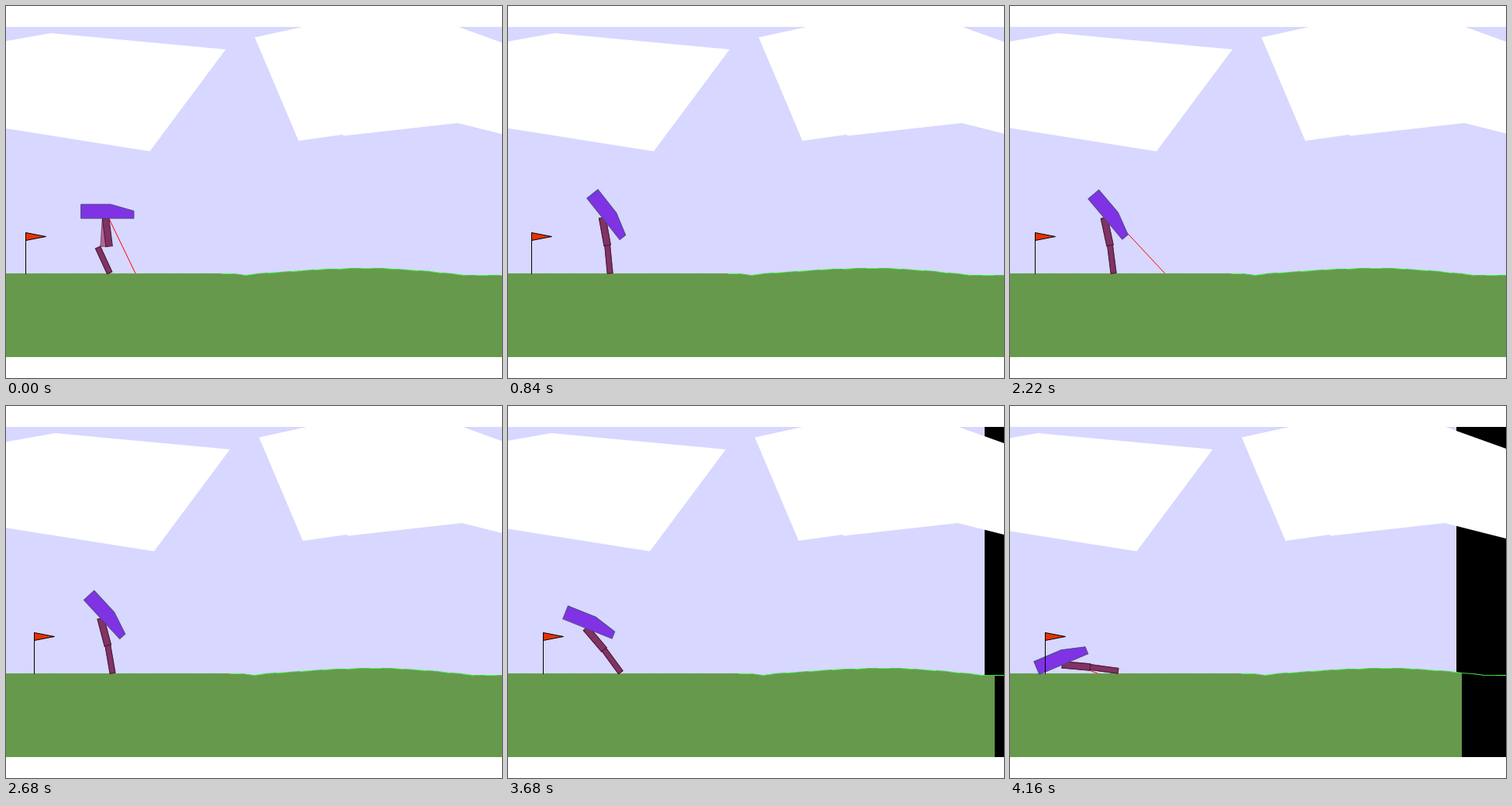
Recreate the animation shown at these times as an HTML page with a canvas. Size 640x480 px, loop 4180 ms.

```html
<!DOCTYPE html>
<html>
<head>
<meta charset="utf-8">
<title>Two-legged walker</title>
<style>
html, body { margin: 0; width: 100%; height: 100%; overflow: hidden; background: #fff; }
canvas { display: block; }
</style>
</head>
<body>
<canvas id="stage" width="640" height="480"></canvas>
<script>
const ctx = document.getElementById('stage').getContext('2d');
const { sin, cos, exp, min, max, floor, round, PI } = Math;
const LOOP = 4180, STEP = 20, HOME = 128.3;
const LEG = 36.3, HIP = 8.53, TILE = 14.933, RANGE = 170.7;
const RAD = PI / 180;

const CLOUDS = [
  [[-60, 57.5], [68, 35], [293.5, 56], [195.5, 187.5], [-60, 147]],
  [[331, 40.5], [420, 21], [580, 22], [740, 79.6], [740, 188], [593, 151],
   [446, 167.5], [444, 166], [387.5, 174]]
];
const HULL = [[-32, -9.6], [6.4, -9.6], [36.3, -1.07], [36.3, HIP], [-32, HIP]];
const BACK = ['#b26699', '#7f4c66'], FRONT = ['#7f3366', '#4c1933'];

// Flat start, then one low hill, steeper on its right side
function groundY(x) {
  if (x < 320) return 345.6;
  const d = x - 485;
  return 347.5 - 9 * cos(min(1, d < 0 ? -d / 160 : d / 130) * PI / 2);
}

function shape(points, fill, stroke) {
  ctx.beginPath();
  points.forEach(([x, y]) => ctx.lineTo(x, y));
  ctx.closePath();
  ctx.fillStyle = fill;
  ctx.fill();
  if (stroke) {
    ctx.strokeStyle = stroke;
    ctx.stroke();
  }
}

function line(x0, y0, x1, y1, color) {
  ctx.beginPath();
  ctx.moveTo(x0, y0);
  ctx.lineTo(x1, y1);
  ctx.strokeStyle = color;
  ctx.stroke();
}

function placed(x, y, angle, draw) {
  ctx.save();
  ctx.translate(x, y);
  ctx.rotate(angle * RAD);
  draw();
  ctx.restore();
}

function limb(x, y, angle, width, colors) {
  const w = width / 2;
  placed(x, y, -angle, () => shape([[-w, 0], [w, 0], [w, LEG], [-w, LEG]], ...colors));
}

// Hull pitches forward onto the hip stop, then everything topples back
// like an inverted pendulum. Joints are worked out from the foot upwards.
function pose(t) {
  const pitch = min(t / 470, 1), loose = max(0, 1 - t / 120);
  const fall = exp((t - 4160) * 0.0019);
  const thigh = 10.2 + 74.8 * fall - 3.2 * loose;
  const shin = thigh * 1.035 - 5.5 + 22.8 * loose;
  const tilt = (62 - thigh) * pitch * pitch * (3 - 2 * pitch);
  const footX = 146.5 - 7 * fall * fall + 7.2 * (1 - pitch) ** 2;
  const footY = 345 - 3.2 * fall - 0.5 * loose;
  const kneeX = footX - LEG * sin(shin * RAD);
  const kneeY = footY - LEG * cos(shin * RAD);
  const hipX = kneeX + 14.5 * loose - LEG * sin(thigh * RAD);
  const hipY = kneeY - 1.4 * loose - LEG * cos(thigh * RAD);
  return {
    thigh, shin, tilt, kneeX, kneeY, hipX, hipY, loose,
    x: hipX + HIP * sin(tilt * RAD),
    y: hipY - HIP * cos(tilt * RAD)
  };
}

function rim(i) {
  return [i * TILE, floor(groundY(i * TILE)) + 0.5];
}

function drawGround(tiles) {
  const points = Array.from({ length: tiles + 1 }, (_, i) => rim(i));
  const edge = Math.ceil(tiles * TILE);
  shape([...points, [edge, points[tiles][1]], [edge, 460], [0, 460]], '#66994c');
}

function drawTurf() {
  for (let i = 0; i < 46; i++) {
    const color = i < 20 ? '#59a84c' : i % 2 ? '#4ccc4c' : '#4cff4c';
    line(...rim(i), ...rim(i + 1), color);
  }
}

// One ray of the sweep per step: out, back, then a long rest
function drawRay(b, step) {
  const n = (3 + step) % 100;
  if (n >= 20) return;
  const angle = 0.15 * min(n, 19 - n);
  const reach = min(RANGE, (346 - b.y) / cos(angle));
  line(b.x, b.y, b.x + reach * sin(angle), b.y + reach * cos(angle), '#f00');
}

function drawWalker(b) {
  const lag = b.loose > 0 ? 0 : 1.2 * max(0, 1 - b.thigh / 25);
  limb(b.hipX, b.hipY, b.thigh - 11 * b.loose, 8.53, BACK);
  limb(b.kneeX, b.kneeY, b.shin + lag, 6.83, BACK);
  limb(b.hipX, b.hipY, b.thigh, 8.53, FRONT);
  limb(b.kneeX, b.kneeY, b.shin, 6.83, FRONT);
  placed(b.x, b.y, b.tilt, () => shape(HULL, '#7f33e5', '#4c4c7f'));
}

function drawFlag() {
  const x = 45.5;
  line(x, 346, x, 292.5, '#000');
  shape([[x, 292.5], [x, 302.5], [x + 26, 297.5]], '#e63300', '#000');
}

function render(t) {
  const step = floor(t / STEP);
  const body = pose(step * STEP);
  const scroll = round(body.x - HOME);
  const sky = 640 + min(scroll, 0);

  ctx.fillStyle = '#fff';
  ctx.fillRect(0, 0, 640, 480);
  ctx.save();
  ctx.beginPath();
  ctx.rect(0, 27, 640, 426);
  ctx.clip();
  ctx.fillStyle = '#000';
  ctx.fillRect(0, 27, 640, 426);
  ctx.fillStyle = '#d7d7ff';
  ctx.fillRect(0, 27, sky, 426);

  ctx.save();
  ctx.translate(-Math.abs(scroll) / 2, 0);
  CLOUDS.forEach(c => shape(c, '#fff'));
  ctx.restore();

  const shift = max(scroll, 0);
  ctx.translate(-shift, 0);
  drawGround(floor((sky + shift) / TILE) + 1);
  drawRay(body, step);
  drawTurf();
  drawWalker(body);
  drawFlag();
  ctx.restore();
}

const start = performance.now();
function tick() {
  render((performance.now() - start) % LOOP);
  requestAnimationFrame(tick);
}
tick();
</script>
</body>
</html>
```
